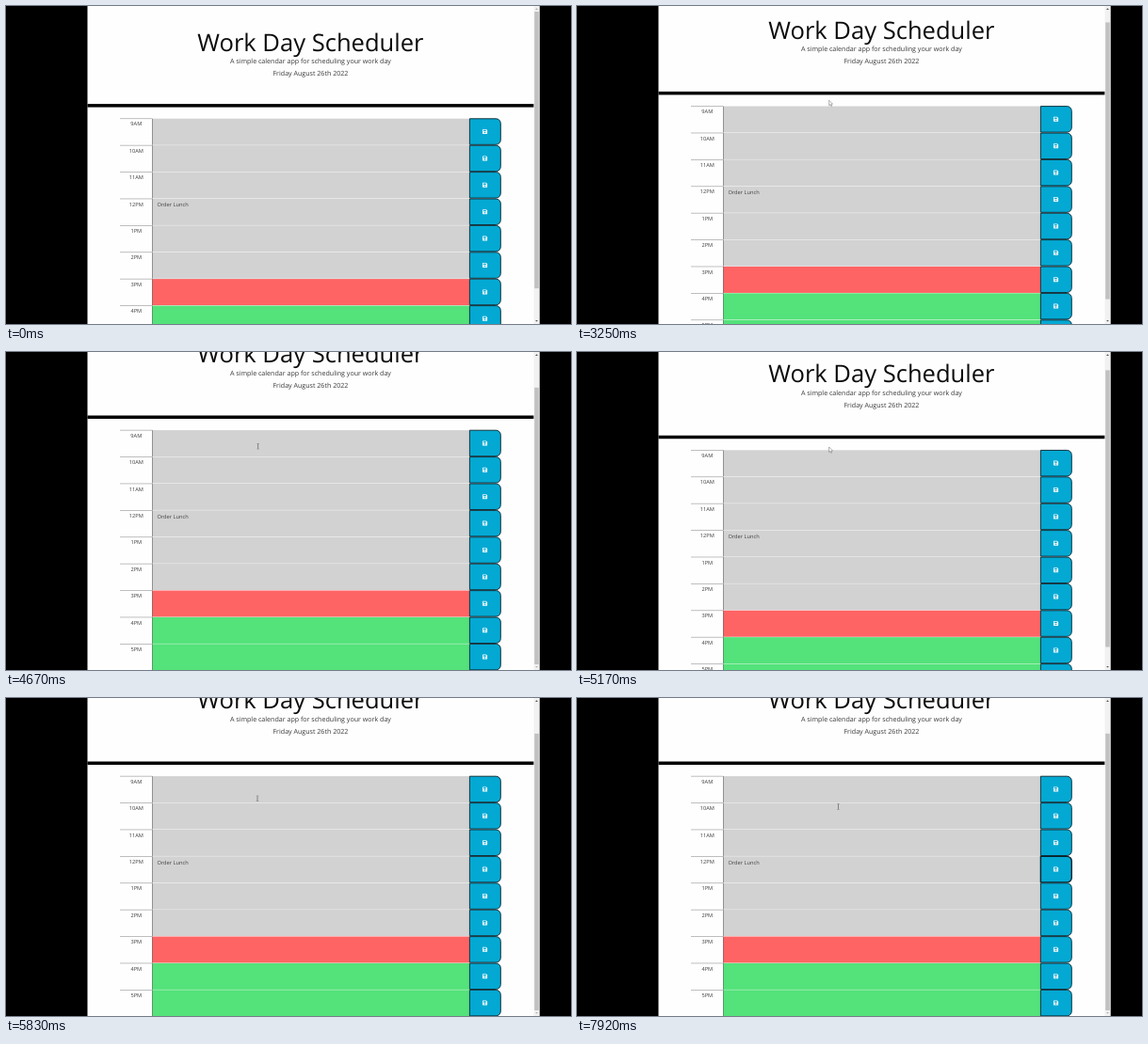
An HTML page with a canvas that plays this animation: 600 px wide and 338 px high, repeating every 8000 ms.

```html
<!DOCTYPE html>
<html lang="en">
<head>
<meta charset="utf-8">
<title>Work Day Scheduler</title>
<style>
html, body { margin: 0; width: 100%; height: 100%; overflow: hidden; background: #000; }
canvas { display: block; width: 600px; height: 338px; }
</style>
</head>
<body>
<canvas id="stage" width="600" height="338"></canvas>
<script>
const ctx = document.getElementById('stage').getContext('2d');
const LOOP = 8000, STEP = 1000 / 12;
const W = 600, H = 338;
const PAGE = { left: 86.3, right: 566.7, bar: 560.6, mid: 323.4 };
const ROW = { top: 119.3, height: 28.4, left: 121, area: 155, button: 492, right: 525.7 };
const MAX_SCROLL = 36.6;
const HOURS = ['9AM', '10AM', '11AM', '12PM', '1PM', '2PM', '3PM', '4PM', '5PM'];
const NOTES = { '12PM': 'Order Lunch' };
const NOW = 6;
const CLICK = { time: 6750, hour: '12PM' };
const COLORS = { past: '#d2d2d2', present: '#ff6464', future: '#54e27a', button: '#03a9d3' };

const clamp = v => Math.min(1, Math.max(0, v));
const easeOut = u => 1 - (1 - u) ** 2;
const easeInOut = u => u * u * (3 - 2 * u);
const span = (t, start, length) => clamp((t - start) / length);

function scrollAt(t) {
  const down = easeOut(span(t, 3130, 600));
  const up = easeOut(span(t, 5040, 360));
  const again = easeOut(span(t, 5460, 315));
  return MAX_SCROLL * (down - up + again);
}

// Pointer stops: time, x, y
const STOPS = [
  [2240, 312, 90], [2500, 277, 99.5], [2583, 267.7, 100.2], [5080, 267.7, 100.2],
  [5500, 267, 106.8], [5900, 267, 106.8], [6650, 507, 180], [7130, 507, 180], [7920, 277.5, 115.5]
];

function pointerAt(t) {
  if (t < STOPS[0][0]) return null;
  const next = STOPS.findIndex(s => s[0] > t);
  const b = next < 0 ? STOPS[STOPS.length - 1] : STOPS[next];
  const a = next < 0 ? b : STOPS[next - 1];
  const u = a === b ? 1 : easeInOut((t - a[0]) / (b[0] - a[0]));
  return { x: a[1] + (b[1] - a[1]) * u, y: a[2] + (b[2] - a[2]) * u };
}

function rect(x, y, w, h, color) {
  ctx.fillStyle = color;
  ctx.fillRect(x, y, w, h);
}

function shape(points, fill, stroke, width = 0.6) {
  ctx.beginPath();
  points.forEach(([x, y]) => ctx.lineTo(x, y));
  ctx.closePath();
  ctx.fillStyle = fill;
  ctx.fill();
  if (stroke) {
    ctx.strokeStyle = stroke;
    ctx.lineWidth = width;
    ctx.stroke();
  }
}

function text(str, x, y, size, color, align = 'center') {
  ctx.font = `400 ${size}px "Open Sans", sans-serif`;
  ctx.textAlign = align;
  ctx.fillStyle = color;
  ctx.fillText(str, x, y);
}

function drawHeader() {
  text('Work Day Scheduler', PAGE.mid, 47.8, 25.56, '#0c0c0c');
  text('A simple calendar app for scheduling your work day', PAGE.mid, 61.4, 7.1, '#383838');
  text('Friday August 26th 2022', PAGE.mid, 74.2, 7.1, '#383838');
  rect(PAGE.left, 104.1, PAGE.bar - PAGE.left, 3.5, '#000');
}

function drawSaveIcon(cx, cy) {
  ctx.save();
  ctx.translate(cx, cy);
  shape([[-2.5, -2.5], [1.4, -2.5], [2.5, -1.4], [2.5, 2.5], [-2.5, 2.5]], '#fff');
  rect(-1.7, -1.8, 2.9, 1.4, COLORS.button);
  ctx.beginPath();
  ctx.arc(0, 1, 0.8, 0, Math.PI * 2);
  ctx.fill();
  ctx.restore();
}

function drawButton(y, focused) {
  const w = ROW.right - ROW.button;
  ctx.beginPath();
  ctx.roundRect(ROW.button + 0.4, y + 0.5, w - 0.8, ROW.height - 0.9, [0, 5, 5, 0]);
  ctx.fillStyle = COLORS.button;
  ctx.fill();
  ctx.strokeStyle = '#06222b';
  ctx.lineWidth = focused ? 1.4 : 0.9;
  ctx.stroke();
  drawSaveIcon(508.6, y + 14.2);
}

function drawRow(hour, i, t) {
  const y = ROW.top + i * ROW.height;
  const state = i < NOW ? 'past' : i === NOW ? 'present' : 'future';
  rect(ROW.left, y + 0.1, ROW.area - ROW.left, 0.7, '#a4a4a4');
  text(hour, 138.3, y + 8, 5.68, '#3c3c3c');
  rect(ROW.area, y + 0.4, ROW.button - ROW.area, ROW.height - 0.4, COLORS[state]);
  rect(ROW.area, y + 0.4, 0.6, ROW.height - 0.4, '#666');
  if (NOTES[hour]) text(NOTES[hour], 160.5, y + 8.6, 5.68, '#444', 'left');
  drawButton(y, hour === CLICK.hour && t >= CLICK.time);
}

function drawScrollbar(scroll) {
  const track = H - 12, full = H + MAX_SCROLL;
  rect(PAGE.bar, 0, PAGE.right - PAGE.bar, H, '#f1f1f1');
  rect(561.2, 6 + track * scroll / full, 4.6, track * H / full, '#c1c1c1');
  const arrow = (y, dir, on) =>
    shape([[562.1, y + dir], [563.5, y - dir * 0.6], [564.9, y + dir]], on ? '#505050' : '#a8a8a8');
  arrow(2.9, 1, scroll > 0.5);
  arrow(335, -1, scroll < MAX_SCROLL - 0.5);
}

function drawArrow() {
  shape([[0, 0], [0, 5.6], [1.3, 4.4], [2.1, 6.4], [3, 6], [2.2, 4.1], [3.8, 4]], '#fff', '#666', 0.5);
}

function drawBeam() {
  rect(-0.4, -2.6, 0.8, 5.2, '#6c6c6c');
  rect(-1.3, -3.1, 2.6, 0.6, '#808080');
  rect(-1.3, 2.5, 2.6, 0.6, '#808080');
}

function drawHand() {
  shape([[-0.6, 0.2], [0.5, 0.2], [0.6, 2.8], [3.2, 3.5], [3.5, 4.6], [2.7, 7.8],
    [-0.4, 7.8], [-2.3, 4.9], [-1.8, 4.2], [-0.6, 5]], '#fff', '#111');
}

function drawPointer(p, scroll) {
  const overRows = p.y + scroll > ROW.top;
  ctx.save();
  ctx.translate(p.x, p.y);
  if (overRows && p.x > ROW.button && p.x < ROW.right) drawHand();
  else if (overRows && p.x > ROW.area && p.x < ROW.button) drawBeam();
  else drawArrow();
  ctx.restore();
}

function draw(t) {
  const scroll = scrollAt(t);
  rect(0, 0, W, H, '#000');
  ctx.save();
  ctx.beginPath();
  ctx.rect(PAGE.left, 0, PAGE.right - PAGE.left, H);
  ctx.clip();
  rect(PAGE.left, 0, PAGE.right - PAGE.left, H, '#fefefe');
  ctx.save();
  ctx.translate(0, -scroll);
  drawHeader();
  HOURS.forEach((hour, i) => drawRow(hour, i, t));
  ctx.restore();
  drawScrollbar(scroll);
  const pointer = pointerAt(t);
  if (pointer) drawPointer(pointer, scroll);
  ctx.restore();
}

ctx.textRendering = 'geometricPrecision';
const begin = performance.now();
function tick() {
  const t = (performance.now() - begin) % LOOP;
  draw(Math.floor((t + 5) / STEP) * STEP);
  requestAnimationFrame(tick);
}
tick();
</script>
</body>
</html>
```
